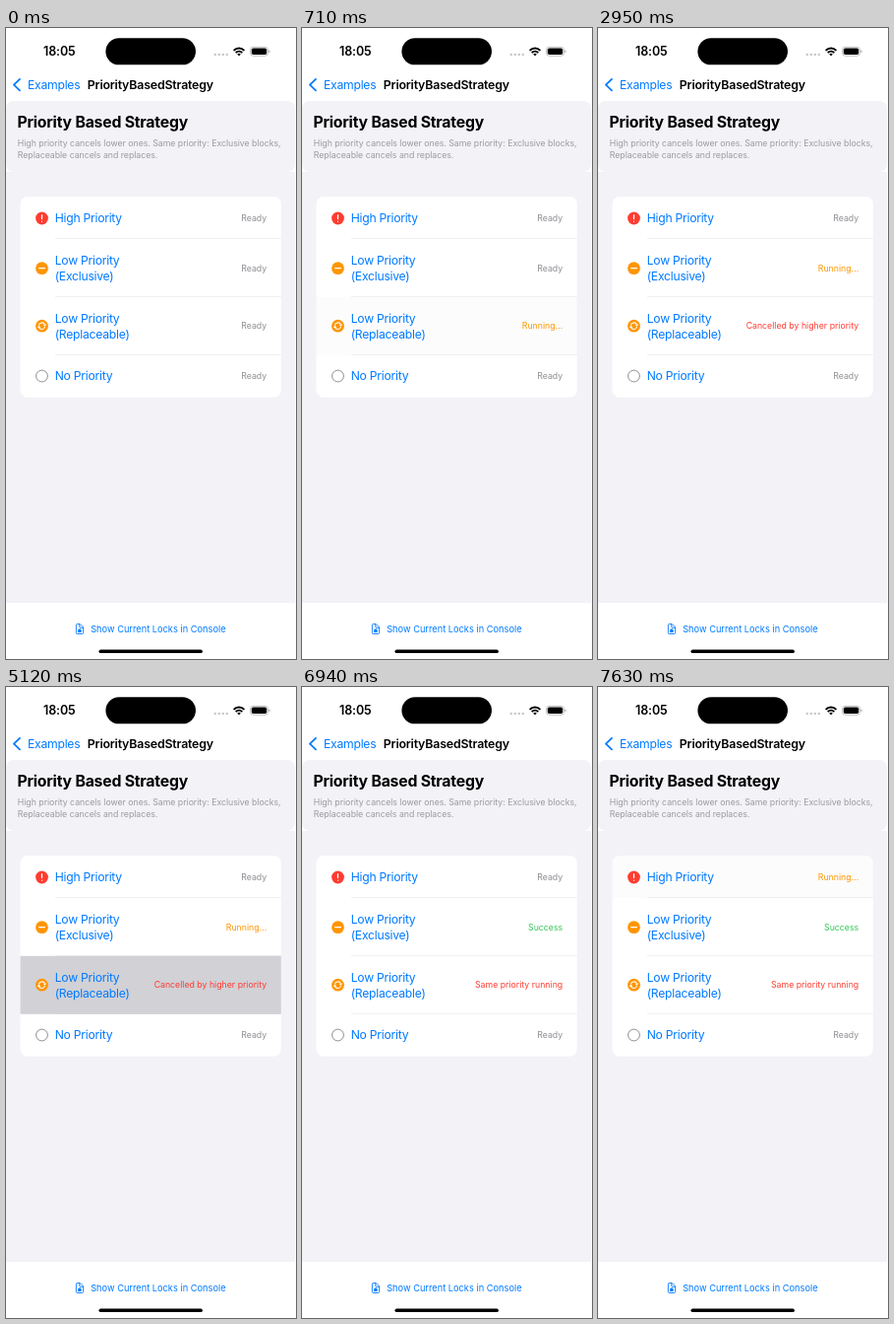
These frames come from a looping animation (295x640 px, 8 s). An HTML page:

```html
<!DOCTYPE html>
<html lang="en">
<head>
<meta charset="utf-8">
<title>Priority Based Strategy</title>
<style>
  html, body { margin: 0; width: 100%; height: 100%; overflow: hidden; background: #fff; }
  svg { display: block; width: 295px; height: 640px; font-family: Inter, Roboto, sans-serif; }
  .body { font-size: 12.2px; letter-spacing: -.26px; }
  .semi { font-size: 12.4px; letter-spacing: -.19px; font-weight: 600; }
  .clock { font-size: 12.5px; letter-spacing: -.1px; font-weight: 600; }
  .small { font-size: 8.75px; }
  .note { font-size: 8.75px; letter-spacing: -.025px; }
  .foot { font-size: 9.25px; }
  .title { font-size: 15.8px; letter-spacing: -.22px; font-weight: 700; }
  .link { fill: #007aff; }
  .status { text-anchor: end; }
  .line { fill: none; stroke-linecap: round; stroke-linejoin: round; }
</style>
</head>
<body>
<svg viewBox="0 0 295 640">
  <defs>
    <clipPath id="card"><rect x="14.6" y="171" width="265.2" height="203.7" rx="7.4"/></clipPath>
  </defs>
  <rect width="295" height="640" fill="#fff"/>

  <!-- status bar -->
  <text class="clock" x="38" y="28.2">18:05</text>
  <rect x="101.4" y="10.25" width="91.6" height="27.1" rx="13.55"/>
  <g fill="#c9c9cb">
    <circle cx="212.8" cy="27" r="1.3"/><circle cx="216.8" cy="27" r="1.3"/>
    <circle cx="220.8" cy="27" r="1.3"/><circle cx="224.8" cy="27" r="1.3"/>
  </g>
  <path d="M231.6 22.8a7.6 7.6 0 0 1 10.8 0M233.7 25a4.7 4.7 0 0 1 6.6 0"
    fill="none" stroke="#000" stroke-width="1.9"/>
  <path d="M237 28.4l-1.8-1.9a2.6 2.6 0 0 1 3.6 0z"/>
  <rect x="248.6" y="19.3" width="17.8" height="8.9" rx="2.9" fill="none" stroke="#a6a6a6" stroke-width=".75"/>
  <rect x="249.8" y="20.5" width="15.4" height="6.5" rx="1.8"/>
  <path d="M267.5 22.3q1.2.5 1.2 1.5t-1.2 1.5z" fill="#a6a6a6"/>

  <!-- navigation -->
  <path class="line" d="M14 51.8L8 57.6l6 5.8" stroke="#007aff" stroke-width="1.8"/>
  <text class="body link" x="22" y="62">Examples</text>
  <text class="semi" x="82.8" y="62">PriorityBasedStrategy</text>

  <!-- heading -->
  <rect y="146" width="294" height="437" fill="#f2f2f7"/>
  <rect y="74" width="294" height="72" rx="7.4" fill="#f2f2f7"/>
  <text class="title" x="11.5" y="101">Priority Based Strategy</text>
  <g class="note" fill="#9a9a9f">
    <text x="11.8" y="120.3">High priority cancels lower ones. Same priority: Exclusive blocks,</text>
    <text x="11.8" y="132">Replaceable cancels and replaces.</text>
  </g>

  <!-- list -->
  <g clip-path="url(#card)">
    <rect x="14" y="171" width="267" height="204" fill="#fff"/>
    <path d="M50 213.5h230M50 272.5h230M50 331.5h230" stroke="#eaeaec" stroke-width=".7"/>
    <g id="rows"></g>
  </g>
  <circle cx="36.5" cy="193" r="6.4" fill="#ff3b30"/>
  <path class="line" d="M36.5 189.6v3.9M36.5 196.1v.1" stroke="#fff" stroke-width="1.3"/>
  <circle cx="36.5" cy="243.7" r="6.4" fill="#ff9500"/>
  <path class="line" d="M33.6 243.7h5.8" stroke="#fff" stroke-width="1.2"/>
  <circle cx="36.5" cy="302.2" r="6.4" fill="#ff9500"/>
  <path class="line" d="M33.5 301a3.3 3.3 0 0 1 5.6-.9M39.5 303.4a3.3 3.3 0 0 1-5.6.9"
    stroke="#fff" stroke-width="1.1"/>
  <path d="M41.1 300.5l-1.4 2.3-2.1-2.1zM31.9 303.9l1.4-2.3 2.1 2.1z" fill="#fff"/>
  <circle cx="36.5" cy="353" r="5.9" fill="none" stroke="#8e8e93" stroke-width="1"/>

  <!-- footer -->
  <g class="line" stroke="#007aff" stroke-width=".9">
    <path d="M74.8 604.5h-2.4q-1 0-1 1v8q0 1 1 1h5.2q1 0 1-1v-5.2zv2.8q0 1 1 1h2.8"/>
    <path d="M73.8 610.7h2.4v1.9h-2.4z" fill="#007aff"/>
    <path d="M74.2 610.4v-.7q.8-1 1.6 0v.7" stroke-width=".6"/>
  </g>
  <text class="foot link" x="86.2" y="612.7">Show Current Locks in Console</text>
  <rect x="94.5" y="630.4" width="105.4" height="3.7" rx="1.85"/>
</svg>
<script>
const LOOP = 8000;
const STATES = {
  ready: ["Ready", "#8e8e93"],
  running: ["Running...", "#ff9500"],
  cancelled: ["Cancelled by higher priority", "#ff3b30"],
  blocked: ["Same priority running", "#ff3b30"],
  success: ["Success", "#34c759"]
};
// top, height, status baseline, label lines as [baseline, text]
const ROWS = [
  [171, 42.5, 196, [[197.3, "High Priority"]]],
  [213.5, 59.3, 246.8, [[240.2, "Low Priority"], [256.3, "(Exclusive)"]]],
  [272.8, 59, 305.3, [[299, "Low Priority"], [315.1, "(Replaceable)"]]],
  [331.8, 43, 356.1, [[357.3, "No Priority"]]]
];
// time, row, press tint, status
const STEPS = [
  [500, 2, 1], [600, 2, .5, "running"], [710, 2, .07],
  [2640, 2, 0], [2640, 1, 1],
  [2750, 1, .5, "running"], [2750, 2, 0, "cancelled"], [2850, 1, .07], [2950, 1, 0],
  [5120, 2, 1], [5220, 2, .5, "blocked"], [5330, 2, .07], [5430, 2, 0],
  [6940, 1, 0, "success"],
  [7410, 0, 1], [7520, 0, .5, "running"], [7630, 0, .07]
];

const list = document.getElementById("rows");
function add(tag, attrs, text = "") {
  const el = document.createElementNS("http://www.w3.org/2000/svg", tag);
  for (const key in attrs) el.setAttribute(key, attrs[key]);
  el.textContent = text;
  return list.appendChild(el);
}

const views = ROWS.map(([y, height, base, lines]) => {
  const tint = add("rect", { x: 14, y, width: 267, height, fill: "#d1d1d6" });
  for (const [ly, text] of lines) add("text", { class: "body link", x: 49.7, y: ly }, text);
  return { tint, status: add("text", { class: "small status", x: 265.2, y: base }) };
});

function draw(now) {
  const t = now % LOOP;
  const rows = ROWS.map(() => ({ press: 0, state: "ready" }));
  for (const [at, i, press, state] of STEPS) {
    if (at > t) break;
    rows[i].press = press;
    if (state) rows[i].state = state;
  }
  rows.forEach(({ press, state }, i) => {
    const { tint, status } = views[i];
    const [text, color] = STATES[state];
    tint.setAttribute("opacity", press);
    if (status.textContent !== text) status.textContent = text;
    status.setAttribute("fill", color);
  });
}

const start = performance.now();
function tick() {
  draw(performance.now() - start);
  requestAnimationFrame(tick);
}
tick();
</script>
</body>
</html>
```
